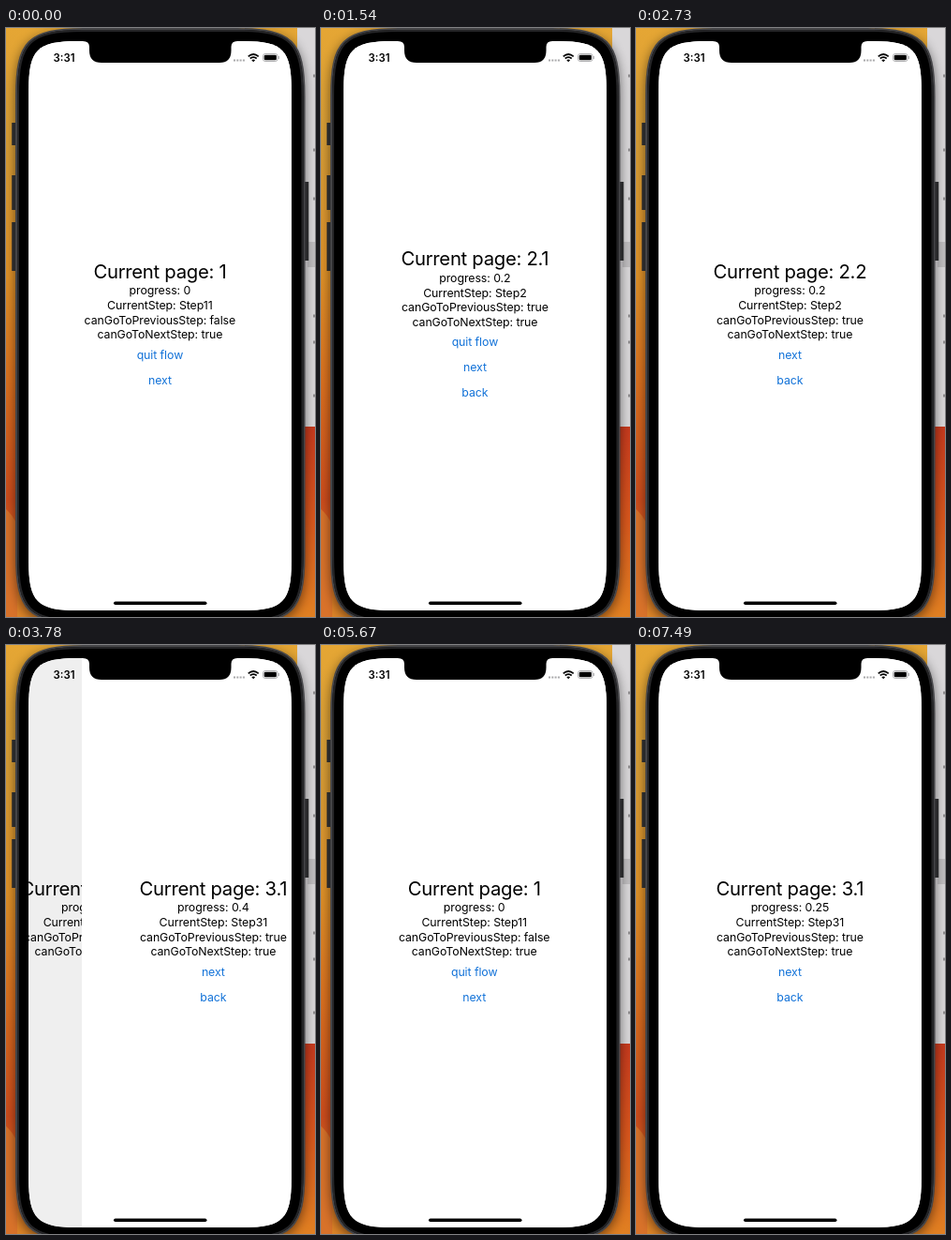
An HTML page for the animation above (8000 ms loop, 330x628 px).

```html
<!DOCTYPE html>
<html lang="en">
<head>
<meta charset="utf-8">
<title>Step flow</title>
<style>
  html, body { margin: 0; width: 100%; height: 100%; overflow: hidden; background: #000; }
  svg { display: block; width: 330px; height: 628px; }
  text { font: 12.35px Inter, Roboto, "Liberation Sans", sans-serif; letter-spacing: -0.006em; text-anchor: middle; fill: #000; }
  .title { font-size: 20.3px; letter-spacing: -0.014em; }
  .button { fill: #1272d8; }
  .clock { font-size: 11.4px; font-weight: 600; letter-spacing: 0; }
</style>
</head>
<body>
<svg viewBox="0 0 330 628">
  <defs>
    <linearGradient id="wall" x2="0" y2="1">
      <stop offset="0" stop-color="#e5a634"/>
      <stop offset=".2" stop-color="#d69c36"/>
      <stop offset=".42" stop-color="#dd9028"/>
      <stop offset=".6" stop-color="#d9701f"/>
      <stop offset=".8" stop-color="#cc4c1c"/>
      <stop offset="1" stop-color="#dd8528"/>
    </linearGradient>
    <linearGradient id="wallRight" x2="0" y2="1">
      <stop offset="0" stop-color="#c63a1e"/>
      <stop offset=".5" stop-color="#d9581d"/>
      <stop offset="1" stop-color="#e08022"/>
    </linearGradient>
    <filter id="blur" x="-20%" width="140%" y="-10%" height="120%"><feGaussianBlur stdDeviation="6"/></filter>
    <clipPath id="screen"><path id="screenShape"/></clipPath>
  </defs>

  <rect width="330" height="628" fill="url(#wall)"/>
  <path d="M0 513Q7 519 12 530V628H0Z" fill="#d8722a"/>
  <rect x="300" y="425" width="30" height="203" fill="url(#wallRight)"/>
  <rect x="311" width="19" height="425" fill="#d9d7d9"/>
  <rect x="322" y="228" width="8" height="27" fill="#bfbdbf"/>
  <path d="M328 51h2M328 130h2M328 182h2M328 307h2M328 335h2M328 392h2" stroke="#8f8d8f" stroke-width="3"/>

  <path id="shadow" opacity=".5" filter="url(#blur)"/>
  <path d="M8.500 101v24M8.500 157v37M8.500 207v52M321 164v84" stroke="#29292b" stroke-width="4.500"/>
  <path id="body" stroke="#454548" stroke-width="2"/>
  <path id="rim" fill="none" stroke="#252527" stroke-width="2"/>

  <g clip-path="url(#screen)">
    <rect x="24" y="13" width="282" height="609" fill="#fff"/>
    <g id="pages"></g>
  </g>

  <path d="M82 13H247V14Q240.500 14 240.500 20V24Q240.500 37 228 37H102Q89 37 89 24V20Q89 14 82 14Z"/>
  <text class="clock" x="62" y="36.100">3:31</text>
  <path d="M243 34.500h12" stroke="#a9a9ab" stroke-width="2" stroke-dasharray="2 1.300"/>
  <path d="M258.700 30.300Q264.200 25.700 269.700 30.300M260.700 32.500Q264.200 29.700 267.700 32.500" fill="none" stroke="#000" stroke-width="1.700"/>
  <path d="M262.300 34.200Q264.200 32.700 266.100 34.200L264.200 36.200Z"/>
  <rect x="274.500" y="27.500" width="15.500" height="8" rx="2.300" fill="none" stroke="#a0a0a2" stroke-width=".8"/>
  <rect x="275.700" y="28.700" width="13.100" height="5.600" rx="1.200"/>
  <path d="M291.200 30v3" stroke="#a0a0a2"/>
  <rect x="115" y="611.500" width="99.500" height="3.600" rx="1.800"/>
</svg>
<script>
const LOOP = 8000, TICK = 70;
const WIDTH = 281, PARALLAX = 84, OMEGA = 0.01826, CENTER = 164.4;
const SVG = "http://www.w3.org/2000/svg";
const layer = document.getElementById("pages");

// Rectangle whose corners ease smoothly into the sides.
function smoothRect(id, left, top, right, bottom, radius) {
  const d = radius * 1.53, a = radius * 0.27;
  document.getElementById(id).setAttribute("d",
    `M${left} ${top + d}C${left} ${top + a} ${left + a} ${top} ${left + d} ${top}` +
    `H${right - d}C${right - a} ${top} ${right} ${top + a} ${right} ${top + d}` +
    `V${bottom - d}C${right} ${bottom - a} ${right - a} ${bottom} ${right - d} ${bottom}` +
    `H${left + d}C${left + a} ${bottom} ${left} ${bottom - a} ${left} ${bottom - d}Z`);
}
smoothRect("shadow", 10, 4, 319.5, 638, 47);
smoothRect("body", 11, 1, 318.5, 634, 47);
smoothRect("rim", 13, 3, 316.5, 632, 45);
smoothRect("screenShape", 24.2, 14, 304.8, 621, 34);

function add(parent, tag, attrs, content = "") {
  const el = document.createElementNS(SVG, tag);
  for (const key in attrs) el.setAttribute(key, attrs[key]);
  el.textContent = content;
  return parent.appendChild(el);
}

function makePage(number, labels) {
  const root = add(layer, "g", {});
  const shift = (2 - labels.length) * 13.5;
  add(root, "rect", { x: 24, y: 13, width: 282, height: 609, fill: "#fff" });
  const line = (y, size, kind, content) =>
    add(root, "text", { x: CENTER, y: y + shift + size * 0.364, class: kind }, content);
  line(259.3, 20.3, "title", "Current page: " + number);
  const info = [280, 295.7, 311.4, 327].map(y => line(y, 12.35, "info"));
  const buttons = {};
  labels.forEach((label, i) => {
    buttons[label] = line(348.5 + 27 * i, 12.35, "button", label);
  });
  const shade = add(root, "rect", { x: 24, y: 13, width: 282, height: 609, opacity: 0 });
  return { root, info, buttons, shade };
}

const pages = {
  one: makePage("1", ["quit flow", "next"]),
  twoA: makePage("2.1", ["quit flow", "next", "back"]),
  twoB: makePage("2.2", ["next", "back"]),
  three: makePage("3.1", ["next", "back"])
};

// Each move starts when its button, held since `press`, is let go.
const moves = [
  { press: 770, start: 942, from: "one", to: "twoA", button: "next" },
  { press: 2030, start: 2168, from: "twoA", to: "twoB", button: "next" },
  { press: 3430, start: 3617, from: "twoB", to: "three", button: "next" },
  { press: 5180, start: 5297, from: "three", to: "one", button: "back" },
  { press: 6790, start: 6977, from: "one", to: "three", button: "next" }
];

// The flow state is shared by every page: time, progress, step, can go back.
const states = [
  [0, "0", "Step11", false],
  [942, "0.2", "Step2", true],
  [3617, "0.4", "Step31", true],
  [4410, "0.25", "Step31", true],
  [5297, "0", "Step11", false],
  [6977, "0.25", "Step31", true]
];

function place(page, x, shade) {
  page.root.style.display = "";
  page.root.setAttribute("transform", `translate(${x} 0)`);
  page.shade.setAttribute("opacity", shade);
}

function showInfo(t) {
  const [, progress, step, back] = states.filter(s => s[0] <= t).pop();
  const lines = [
    "progress: " + progress,
    "CurrentStep: " + step,
    "canGoToPreviousStep: " + back,
    "canGoToNextStep: true"
  ];
  for (const page of Object.values(pages)) {
    page.root.style.display = "none";
    page.info.forEach((el, i) => { el.textContent = lines[i]; });
    for (const el of Object.values(page.buttons)) el.setAttribute("opacity", 1);
  }
}

function showPress(t) {
  for (const m of moves) {
    if (t < m.press) continue;
    const fade = Math.min(1, Math.max(0, t - m.start) / 300);
    pages[m.from].buttons[m.button].setAttribute("opacity", 0.2 + 0.8 * fade);
  }
}

function showPages(t) {
  const move = moves.filter(m => m.start <= t).pop();
  if (!move) return place(pages.one, 0, 0);
  const wt = OMEGA * (t - move.start);
  const rest = (1 + wt) * Math.exp(-wt);
  if (rest * WIDTH < 0.4) return place(pages[move.to], 0, 0);
  const pop = move.button === "back";
  const open = pop ? 1 - rest : rest;
  const [lower, upper] = pop ? [move.to, move.from] : [move.from, move.to];
  place(pages[lower], -PARALLAX * (1 - open), 0.08 * (1 - open));
  place(pages[upper], WIDTH * open, 0);
  if (layer.lastChild !== pages[upper].root) layer.append(pages[upper].root);
}

function render(t) {
  showInfo(t);
  showPress(t);
  showPages(t);
}

const begin = performance.now();
let shown = -1;
function frame() {
  const t = (performance.now() - begin) % LOOP;
  const step = Math.floor(t / TICK) * TICK;
  if (step !== shown) render(shown = step);
  requestAnimationFrame(frame);
}
frame();
</script>
</body>
</html>
```
